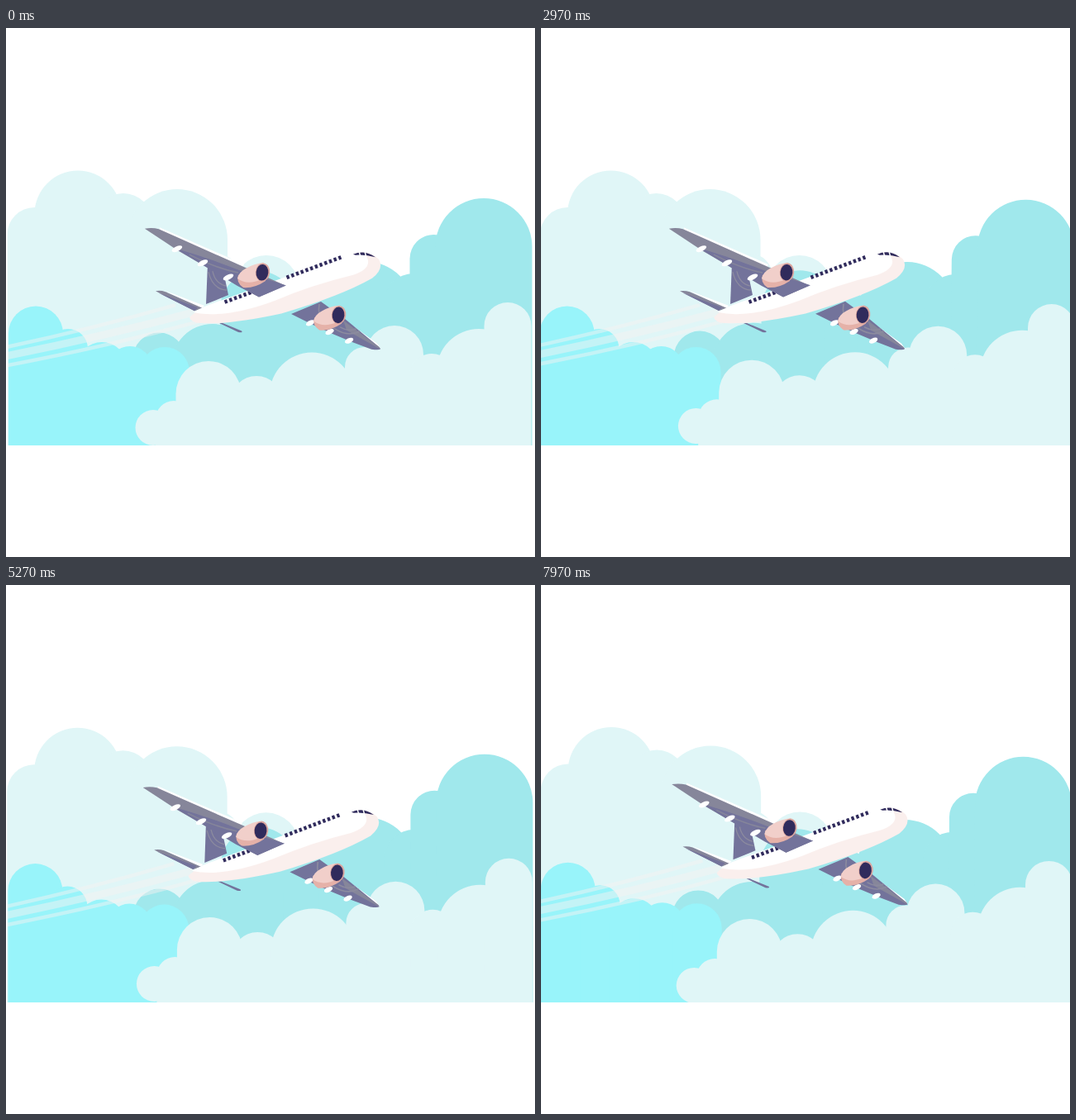
Write an HTML page that moves like this. It is 640x640 px and loops after 8000 ms.

```html
<!DOCTYPE html>
<html lang="en">
<head>
<meta charset="utf-8">
<title>Plane in the clouds</title>
<style>
  html, body { margin: 0; width: 100%; height: 100%; overflow: hidden; background: #fff; }
  svg { display: block; width: 100vw; height: 100vh; }
  .cloud { stroke-linecap: round; }
</style>
</head>
<body>
<svg viewBox="0 0 640 640">
  <defs>
    <clipPath id="sky"><rect width="640" height="505"/></clipPath>
    <g id="engine">
      <path fill="#e5b1a8" d="M281 299Q278 308 287 314Q301 315 314 306L311 285Z"/>
      <path fill="#f1cfca" d="M280 303Q282 295 290 291Q300 285 312 284L309 304Q292 312 280 303Z"/>
      <ellipse cx="310.5" cy="295.5" rx="8.7" ry="11.2" fill="#dba69f" transform="rotate(6 310 296)"/>
      <ellipse cx="310" cy="295.8" rx="7.4" ry="9.8" fill="#302b5c" transform="rotate(6 310 296)"/>
    </g>
  </defs>

  <g clip-path="url(#sky)">
    <g id="paleCloud" class="cloud" stroke="#e0f6f7"></g>
    <g id="tealCloud" class="cloud" stroke="#a0e8ec"></g>
    <g id="cyanCloud" class="cloud" stroke="#98f4fa"></g>
    <g id="trails" fill="none" stroke="#f4f0f0" stroke-opacity=".47">
      <path stroke-width="4.5" d="M-14 388.500Q100 365 205 335"/>
      <path stroke-width="9" d="M-14 399Q110 375 230 343"/>
      <path stroke-width="4.500" d="M-14 410.500Q120 386 240 353"/>
    </g>
    <rect id="leftMargin" x="-30" y="160" width="31.5" height="345" fill="#fff"/>
    <g id="frontCloud" class="cloud" stroke="#e0f6f7">
      <circle cx="178" cy="483.5" r="21.5" fill="#e0f6f7" stroke="none"/>
    </g>
  </g>

  <g id="plane">
    <!-- tail -->
    <path fill="#73739b" d="M262 357L285 366.500Q287 369 281 368L258 357Z"/>
    <path fill="#fff" d="M191 317L240 336L236 340Z"/>
    <path fill="#86869a" d="M181 318Q187 317 193 319L238 339L228 342Z"/>
    <path fill="#73739b" d="M184 320L232 338L228 342Z"/>
    <path fill="#73739b" d="M244 286L263 294L269 323L242 334Z"/>
    <path fill="none" stroke="#8c8b9f" stroke-width="1.3" d="M245 295Q250 316 267 317M250 294Q253 309 266 312"/>

    <!-- right wing -->
    <path fill="#fff" d="M405 350L449 382L453 388L400 357Z"/>
    <path fill="#73739b" d="M345 346L381 331L411 353L451 386Q457 391 442 389Q395 372 345 346Z"/>
    <path fill="#86869a" d="M408 354L451 386L453 389L412 366Z"/>
    <path fill="none" stroke="#8c8b9f" stroke-width="1.6" d="M379 334Q376 348 387 360M396 363Q414 375 428 367M404 362Q414 368 424 364"/>

    <!-- fuselage -->
    <path fill="#faefed" d="M222 350Q232 339 262 330L420 273Q439 268 451 280Q458 291 443 303Q404 325 333 345.500Q270 359 235 357Q224 356 222 350Z"/>
    <path fill="#fff" d="M227 344Q237 337 262 329L420 271.500Q431 271 437 278Q443 291 420 299Q370 311 325 330Q265 352 227 344Z"/>
    <path fill="#302b5c" d="M420 274Q434 268 447 277.500Q434 274 423 275Z"/>
    <path stroke="#fff" stroke-width="1.5" d="M427 270L429 277M434 270L436 278"/>
    <path stroke="#302b5c" stroke-width="4.6" stroke-dasharray="3.4 2.7" d="M339.500 302L405.500 277.500M264.500 331.500L298 319.300"/>

    <!-- left wing -->
    <path fill="#fff" d="M186 241L288 286L285 292L186 245Z"/>
    <path fill="#86869a" d="M168 242.500Q177 241 185 243L290 290L338 311.500L306 325.500L280 311L208 269Z"/>
    <path fill="#73739b" d="M204 266Q245 278 282 293L339 311.500L306 325.500L280 312Z"/>
    <path fill="none" stroke="#86869a" stroke-width="1.500" d="M222 274Q255 291 281 296"/>

    <g id="pods" fill="#fff"></g>
    <use href="#engine"/>
    <use href="#engine" x="92" y="51.7"/>
  </g>
</svg>

<script>
const LOOP = 8000;
const SWAY = 6;
const $ = id => document.getElementById(id);

function add(parent, tag, attrs) {
  const node = document.createElementNS("http://www.w3.org/2000/svg", tag);
  for (const name in attrs) node.setAttribute(name, attrs[name]);
  $(parent).appendChild(node);
}

// A cloud is a row of round-topped columns, each "x,y,radius", reaching below the horizon.
function buildCloud(id, puffs) {
  for (const puff of puffs.split(" ")) {
    const [x, y, radius] = puff.split(",");
    add(id, "path", { d: `M${x} ${y}V560`, "stroke-width": 2 * radius });
  }
}

buildCloud("paleCloud", "34.5,250,33 87,225,52.5 142,235,35 207,256,61 255,301,28 315,315,40");
buildCloud("tealCloud", "185,400,31.5 250,408,50 305,340,46 365,350,30 435,341,58.5 493,333,36 517.5,279,29 578,264.5,58.5");
buildCloud("cyanCloud", "36,369.5,33 75,388,24 116,410,30 150,412,27 192,416,30");
buildCloud("frontCloud", "203,473,22 245,442.5,39.5 303,452,31 370,443.5,51 434,410,24 470,395,35 515,421,27 572,415,51 607,360.5,28.5");

function addPods(x, y, stepX, stepY, rx) {
  for (let i = 0; i < 3; i++)
    add("pods", "ellipse", { rx, ry: 3, transform: `translate(${x + i * stepX} ${y + i * stepY}) rotate(-25)` });
}
addPods(207, 267, 31, 17.2, 6.8);
addPods(368, 357, 23.5, 10.7, 5.5);

const wave = (t, period) => Math.sin(2 * Math.PI * t / period);

function place(id, x, y, angle = 0, pivot = "0 0") {
  $(id).setAttribute("transform", `translate(${x} ${y}) rotate(${angle} ${pivot})`);
}

function draw(now) {
  const t = (now % LOOP) / 1000;
  const drift = (1 - Math.cos(2 * Math.PI * t / SWAY)) / 2;
  const bob = wave(t, SWAY);
  const cloudTilt = 0.2 + 0.36 * wave(t - 0.7, 7.5);
  const planeTilt = 0.15 + 0.6 * wave(t - 0.2, 3);

  place("paleCloud", -2.5 * drift, -0.5 * bob);
  place("leftMargin", -2.5 * drift, 0);
  place("cyanCloud", -4.5 * drift, -0.9 * bob);
  place("tealCloud", 7 * drift, 1.6 * bob, cloudTilt, "390 420");
  place("frontCloud", 10 * drift, 1.6 * bob, cloudTilt, "390 420");
  for (const id of ["trails", "plane"])
    place(id, -13 * drift, -2.1 * bob, planeTilt, "311 318");

  requestAnimationFrame(draw);
}
draw(performance.now());
</script>
</body>
</html>
```
